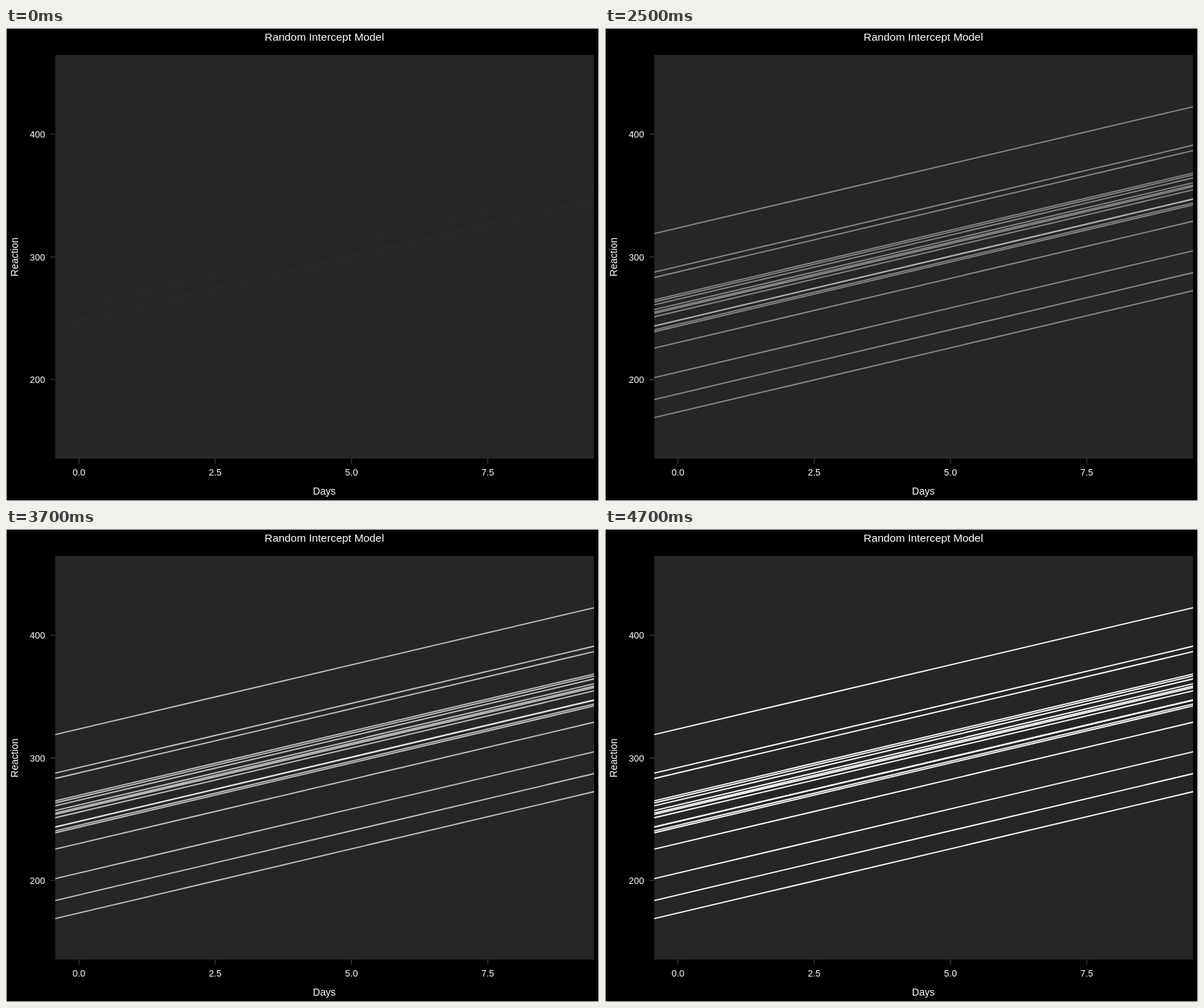
These frames come from a looping animation (837x669 px, 8000 ms). An HTML page:

```html
<!DOCTYPE html>
<html lang="en">
<head>
<meta charset="utf-8">
<title>Random Intercept Model</title>
<style>
  html, body { margin: 0; width: 100%; height: 100%; overflow: hidden; background: #000; }
  svg { display: block; width: 837px; height: 669px; }
  text {
    font: 13px "Liberation Sans", Arial, Helvetica, sans-serif;
    fill: #fff;
    text-anchor: middle;
  }
  .title { font-size: 15.4px; }
  .label { font-size: 14px; }
  .y text { text-anchor: end; }
  .tick { stroke: #333; stroke-width: 1.5; }
  .fits {
    stroke: #fff;
    stroke-width: 1.8;
    animation: fade 8s step-end infinite;
  }
  @keyframes fade {
    0% { stroke-opacity: .012; }
    6.25% { stroke-opacity: .015; }
    11.25% { stroke-opacity: .09; }
    16.25% { stroke-opacity: .18; }
    21.25% { stroke-opacity: .27; }
    25% { stroke-opacity: .36; }
    31.25% { stroke-opacity: .45; }
    36.25% { stroke-opacity: .545; }
    41.25% { stroke-opacity: .635; }
    46.25% { stroke-opacity: .725; }
    50% { stroke-opacity: .82; }
    55% { stroke-opacity: .91; }
    58.75%, 100% { stroke-opacity: 1; }
  }
</style>
</head>
<body>
<svg viewBox="0 0 837 669">
  <defs>
    <clipPath id="panel"><rect x="69.5" y="38" width="760.5" height="571"/></clipPath>
  </defs>
  <rect width="837" height="669" stroke="#fff" stroke-width="1.6"/>
  <rect x="69.5" y="38" width="760.5" height="571" fill="#262626"/>
  <g clip-path="url(#panel)"><g class="fits" id="fits"></g></g>
  <g class="x" id="xAxis"></g>
  <g class="y" id="yAxis"></g>
  <text class="title" x="449.3" y="18.4">Random Intercept Model</text>
  <text class="label" x="449.3" y="660">Days</text>
  <text class="label" transform="translate(17 323.8) rotate(-90)">Reaction</text>
</svg>
<script>
  const NS = "http://www.w3.org/2000/svg";
  const SLOPE = 10.467;
  // fitted intercept of each subject
  const intercepts = [
    292.19, 173.56, 188.30, 255.81, 261.62, 259.63, 267.91, 248.41, 206.12,
    323.59, 230.21, 265.52, 243.54, 287.78, 258.44, 245.04, 248.11, 269.52
  ];
  const px = day => 103 + day * 76.93;
  const py = ms => 323.8 - (ms - 300) * 1.7345;

  function add(parent, tag, attrs, text = "") {
    const el = document.createElementNS(NS, tag);
    for (const key in attrs) el.setAttribute(key, attrs[key]);
    el.textContent = text;
    document.getElementById(parent).append(el);
  }

  function line(parent, x1, y1, x2, y2, cls = "") {
    add(parent, "line", { x1, y1, x2, y2, class: cls });
  }

  for (const b of intercepts) {
    line("fits", px(-1), py(b - SLOPE), px(10), py(b + 10 * SLOPE));
  }
  for (const day of [0, 2.5, 5, 7.5]) {
    line("xAxis", px(day), 609, px(day), 616, "tick");
    add("xAxis", "text", { x: px(day), y: 633.4 }, day.toFixed(1));
  }
  for (const ms of [200, 300, 400]) {
    line("yAxis", 62.5, py(ms), 69.5, py(ms), "tick");
    add("yAxis", "text", { x: 55.2, y: py(ms) + 4.7 }, ms);
  }
</script>
</body>
</html>
```
